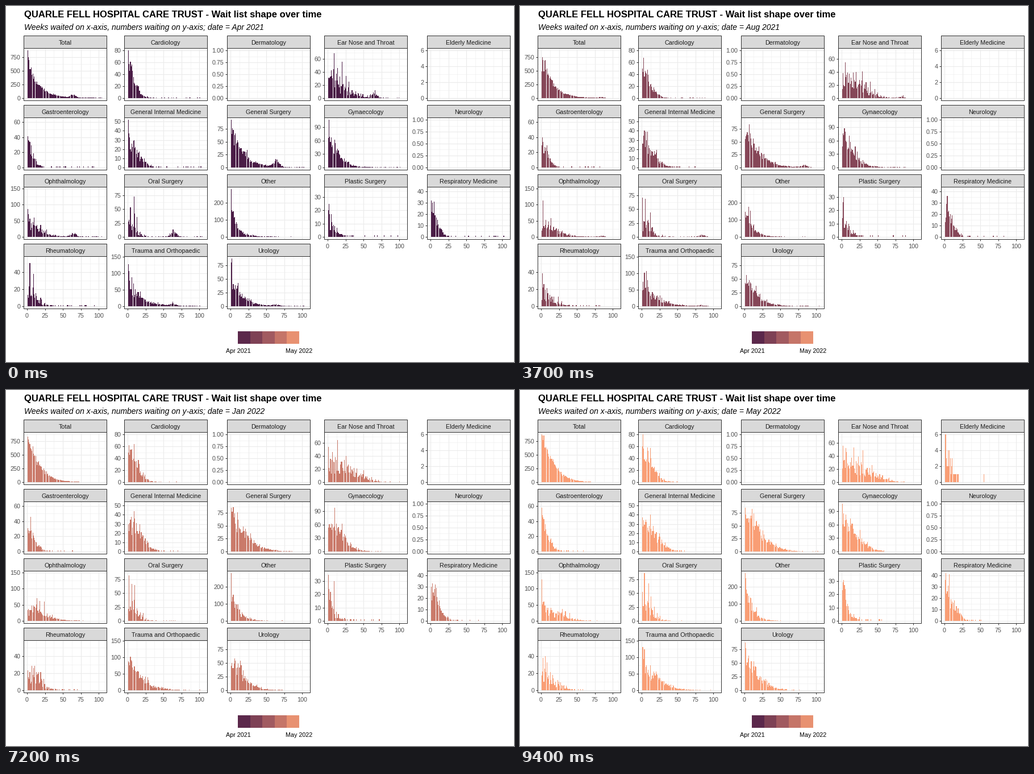
A matplotlib script for the animation above (10 s loop, 894x626 px).

```python
import numpy as np
import matplotlib.pyplot as plt
from matplotlib.animation import FuncAnimation
from matplotlib.collections import LineCollection, PolyCollection
from matplotlib.colors import LinearSegmentedColormap
from matplotlib.patches import Rectangle

W, H, DPI = 894, 626, 100
FRAMES, INTERVAL = 100, 100
LAST_MONTH = 13
WEEKS_PER_MONTH = 4.35
CHANGES = [8, *range(16, 94, 7)]
MONTHS = "Jan Feb Mar Apr May Jun Jul Aug Sep Oct Nov Dec".split()
WEEKS = np.arange(1, 106)

COLUMNS = [31, 208, 389, 560, 741]
PANEL_W, PANEL_H = 146, 92
STRIP_TOP, STRIP_H, ROW_PITCH = 52, 22, 122
X_UNIT = PANEL_W / 115.5
DARK = "#333333"
RAMP = LinearSegmentedColormap.from_list("wait", ["#4A1C46", "#A15A60", "#F99E75"])

plt.rcParams["font.family"] = "Liberation Sans"
fig = plt.figure(figsize=(W / DPI, H / DPI), dpi=DPI, facecolor="white")
ax = fig.add_axes([0, 0, 1, 1])
ax.set(xlim=(0, W), ylim=(H, 0))
ax.axis("off")


def px(size):
    return size * 72 / DPI


def label(x, y, text, size=10.75, **style):
    return ax.text(x, y, text, fontsize=px(size), va="baseline", **style)


class Panel:
    """One facet: a waiting-time histogram that widens over the months.

    The envelope is a stretched exponential. Noise belongs to a cohort of
    patients, so it ages along the x axis, as does the long-wait wave.
    """

    def __init__(self, name, top, step, reach=0, power=1.6, peak=.6,
                 jitter=.25, wave=0, opens=0):
        self.name, self.top, self.step = name, top, step
        self.reach, self.power, self.peak = reach, power, peak
        self.jitter, self.wave, self.opens = jitter, wave, opens

    def place(self, index):
        row, col = divmod(index, 5)
        self.left = COLUMNS[col]
        self.strip = STRIP_TOP + row * ROW_PITCH
        self.roof = self.strip + STRIP_H
        self.floor = self.roof + PANEL_H
        self.zero = self.floor - PANEL_H * .05 / 1.1
        self.y_unit = PANEL_H / 1.1 / self.top
        self.has_x_axis = index + 5 >= len(PANELS)
        rng = np.random.default_rng(40 + index)
        self.noise = np.exp(self.jitter * rng.normal(size=180))
        self.chance = rng.random(180)

    def x(self, week):
        return self.left + (np.asarray(week) + 4.75) * X_UNIT

    def y(self, value):
        return self.zero - np.asarray(value) * self.y_unit

    def counts(self, month):
        if not self.reach or month < self.opens:
            return np.zeros(len(WEEKS))
        t = month / LAST_MONTH
        scale = self.reach * (.85 + .4 * t)
        envelope = self.peak * np.exp(-(WEEKS / scale) ** (self.power + .4 * t))
        # New arrivals surge in spring and dip in winter.
        envelope *= 1 + .6 * np.cos(2 * np.pi * t) * np.exp(1 - WEEKS)
        crest = 64 + WEEKS_PER_MONTH * month
        envelope += self.wave * max(0, 1 - 2 * t) * np.exp(-((WEEKS - crest) / 5) ** 2)
        envelope += .003 * (WEEKS < 105 - 45 * t)
        cohort = WEEKS - round(WEEKS_PER_MONTH * month) + 60
        values = self.top * envelope * self.noise[cohort] + self.chance[cohort]
        return np.minimum(np.floor(values), self.top)


class SinglePatient(Panel):
    """One person, moving right as the wait grows, from May to July."""

    def counts(self, month):
        week = round(6 + 5 * (month - 1.5))
        return 1.0 * (WEEKS == week) * (1 <= month <= 3)


PANELS = [
    Panel("Total", 875, 250, 16, .95, peak=.92, jitter=.1, wave=.05),
    Panel("Cardiology", 80, 20, 15, peak=.65),
    Panel("Dermatology", 1, .25),
    Panel("Ear Nose and Throat", 73, 20, 37, 2, peak=.42, jitter=.42, wave=.12),
    Panel("Elderly Medicine", 6, 2, 9, jitter=.6, opens=LAST_MONTH),
    Panel("Gastroenterology", 63, 20, 11),
    Panel("General Internal Medicine", 52, 10, 21, 1.8),
    Panel("General Surgery", 93, 25, 23, 1.2, peak=.76, jitter=.2, wave=.15),
    Panel("Gynaecology", 107, 30, 22),
    SinglePatient("Neurology", 1, .25),
    Panel("Ophthalmology", 148, 50, 25, peak=.3, jitter=.35, wave=.08),
    Panel("Oral Surgery", 86, 25, 13, peak=.45, jitter=.5, wave=.12),
    Panel("Other", 280, 100, 9.5, .9, peak=.68),
    Panel("Plastic Surgery", 36, 10, 8, 1, jitter=.35),
    Panel("Respiratory Medicine", 42, 10, 14, 1.8),
    Panel("Rheumatology", 56, 20, 18, peak=.32, jitter=.45),
    Panel("Trauma and Orthopaedic", 144, 50, 21, 1.1, peak=.52, wave=.04),
    Panel("Urology", 87, 25, 18, 1.1, peak=.68, wave=.03),
]


def draw_lines(lines, color, width, zorder):
    ax.add_collection(LineCollection(lines, colors=color, linewidths=px(width),
                                     zorder=zorder))


def draw_box(x, y, height, fill):
    ax.add_patch(Rectangle((x, y), PANEL_W, height, fc=fill, ec=DARK,
                           lw=px(1), zorder=4))


def draw_panel(p):
    right, middle = p.left + PANEL_W, p.left + PANEL_W / 2
    breaks = np.arange(0, p.top * 1.05, p.step / 2)
    weeks = np.arange(0, 101, 12.5)
    for start, width in ((1, .55), (0, 1.1)):
        lines = [[(x, p.roof), (x, p.floor)] for x in p.x(weeks[start::2])]
        lines += [[(p.left, y), (right, y)] for y in p.y(breaks[start::2])]
        draw_lines(lines, "#EBEBEB", width, 1)

    marks = []
    for value in breaks[::2]:
        y = p.y(value)
        text = f"{value:.2f}" if p.top == 1 else f"{value:g}"
        label(p.left - 5.5, y + 4, text, ha="right", color="#4D4D4D")
        marks.append([(p.left - 3.4, y), (p.left, y)])
    if p.has_x_axis:
        for week in weeks[::2]:
            x = p.x(week)
            label(x, p.floor + 15.5, f"{week:g}", ha="center", color="#4D4D4D")
            marks.append([(x, p.floor), (x, p.floor + 3.4)])
    draw_lines(marks, DARK, 1, 3)

    draw_box(p.left, p.strip, STRIP_H, "#D9D9D9")
    draw_box(p.left, p.roof, PANEL_H, "none")
    label(middle, p.strip + 15.5, p.name, ha="center", color="#1A1A1A", zorder=5)


def draw_legend(left=408, top=572, width=108, height=22, bins=5):
    step = width / bins
    for i in range(bins):
        ax.add_patch(Rectangle((left + i * step, top), step, height, lw=0,
                               fc=RAMP((i + .5) / bins)))
    label(left + 1, 609.5, "Apr 2021", ha="center")
    label(left + width, 609.5, "May 2022", ha="center")


def month_at(frame):
    """Whole months hold still; each change passes through one halfway step."""
    return sum(frame > c for c in CHANGES) + .5 * (frame in CHANGES)


def bars(panel, month):
    counts = panel.counts(month)
    weeks = WEEKS[counts > 0]
    x0, x1 = panel.x(weeks - .45), panel.x(weeks + .45)
    top = panel.y(counts[counts > 0])
    base = np.full(len(weeks), panel.zero)
    return np.stack([np.stack([x0, x0, x1, x1], 1),
                     np.stack([base, top, top, base], 1)], 2)


for index, panel in enumerate(PANELS):
    panel.place(index)
    draw_panel(panel)
draw_legend()
label(31.5, 20, "QUARLE FELL HOSPITAL CARE TRUST - Wait list shape over time",
      16.65, weight="bold", color="black")
subtitle = label(31.5, 42, "", 13.9, style="italic", color="black")
histogram = PolyCollection([], linewidths=0, zorder=2)
ax.add_collection(histogram, autolim=False)


def update(frame):
    month = month_at(frame)
    histogram.set_verts(np.concatenate([bars(p, month) for p in PANELS]))
    histogram.set_facecolor(RAMP(month / LAST_MONTH))
    year, index = divmod(3 + int(month), 12)
    subtitle.set_text("Weeks waited on x-axis, numbers waiting on y-axis; "
                      f"date = {MONTHS[index]} {2021 + year}")
    return histogram, subtitle


animation = FuncAnimation(fig, update, frames=FRAMES, interval=INTERVAL,
                          repeat=True, repeat_delay=0, blit=False)
plt.show()
```
